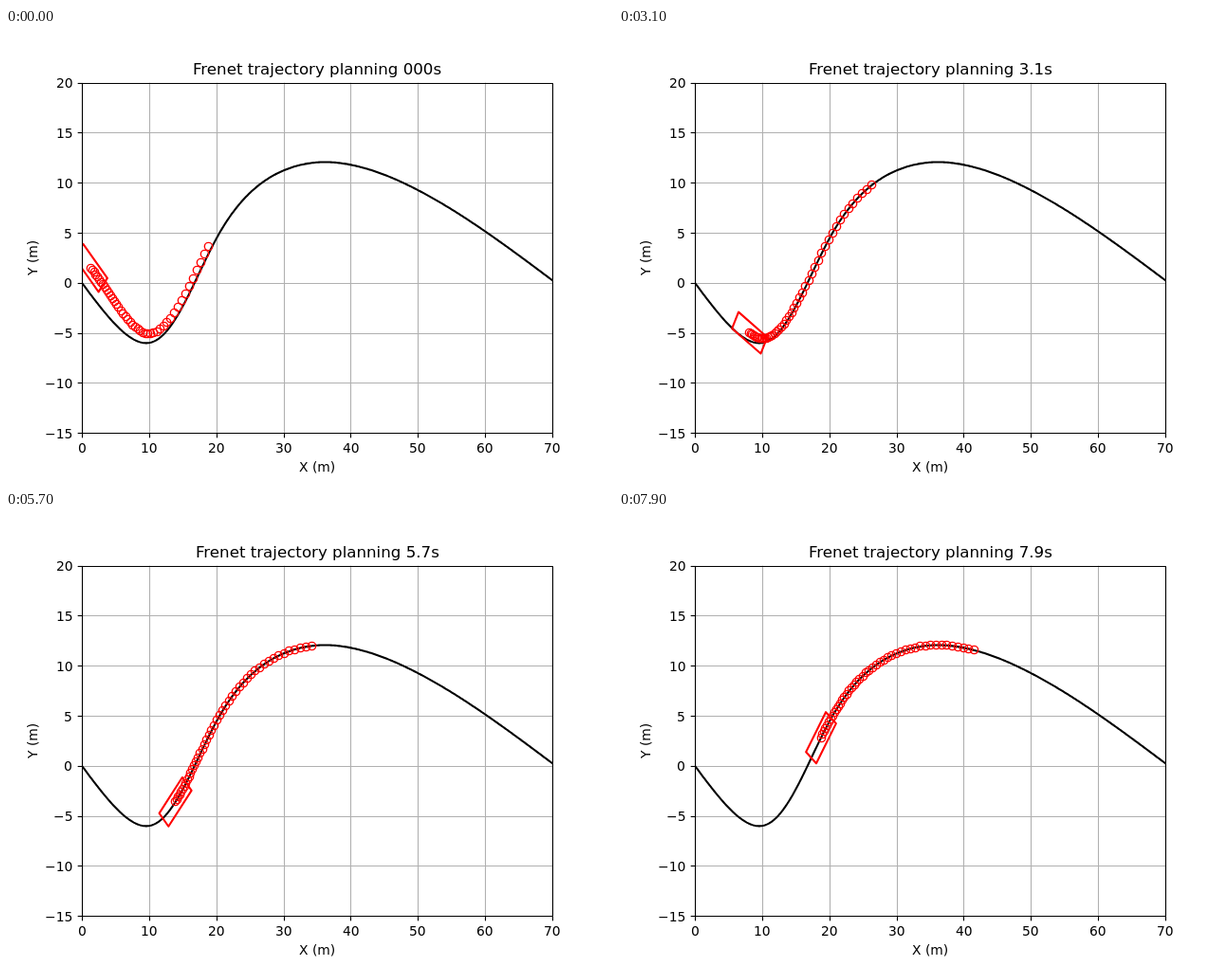
These frames come from a looping animation (640 by 480 pixels, 8 s). An HTML page with a canvas:

```html
<!DOCTYPE html>
<html lang="en">
<head>
<meta charset="utf-8">
<title>Trajectory planning</title>
<style>
  html, body { margin: 0; width: 100%; height: 100%; overflow: hidden; background: #fff; }
  canvas { display: block; width: 640px; height: 480px; }
</style>
</head>
<body>
<canvas id="stage" width="640" height="480"></canvas>
<script>
const ctx = document.getElementById('stage').getContext('2d');
const LOOP = 8000, STEP = 100;
const BOX = { x: 80, y: 57.6, w: 496, h: 369.6 };
const PT = 100 / 72;
const RED = '#ff0000', BLACK = '#000', GRID = '#b0b0b0';

const px = x => BOX.x + x * BOX.w / 70;
const py = y => BOX.y + (20 - y) * BOX.h / 35;
const snap = v => Math.round(v) + 0.5;

// Natural cubic spline through (t[i], v[i])
function spline(t, v) {
  const n = t.length, c = Array(n).fill(0), r = Array(n).fill(0), m = Array(n).fill(0);
  for (let i = 1; i < n - 1; i++) {
    const a = t[i] - t[i - 1], b = t[i + 1] - t[i];
    const den = 2 * (a + b) - a * c[i - 1];
    c[i] = b / den;
    r[i] = (6 * ((v[i + 1] - v[i]) / b - (v[i] - v[i - 1]) / a) - a * r[i - 1]) / den;
  }
  for (let i = n - 2; i > 0; i--) m[i] = r[i] - c[i] * m[i + 1];
  return x => {
    let i = 0;
    while (i < n - 2 && x > t[i + 1]) i++;
    const h = t[i + 1] - t[i], a = (t[i + 1] - x) / h, b = 1 - a;
    return a * v[i] + b * v[i + 1] +
      ((a * a * a - a) * m[i] + (b * b * b - b) * m[i + 1]) * h * h / 6;
  };
}

// Reference road, parametrised by chord length
const wx = [0, 10, 20.5, 28.65, 36, 40, 50, 60, 70.5];
const wy = [0, -6, 5, 10.78, 12.06, 11.79, 9.26, 5.14, 0];
const ws = [0];
for (let i = 1; i < wx.length; i++)
  ws.push(ws[i - 1] + Math.hypot(wx[i] - wx[i - 1], wy[i] - wy[i - 1]));
const roadX = spline(ws, wx), roadY = spline(ws, wy);
const roadEnd = ws[ws.length - 1];

// Point at distance s along the road, d to its left
function place(s, d) {
  const e = 0.01, x = roadX(s), y = roadY(s);
  const dx = roadX(s + e) - x, dy = roadY(s + e) - y, l = Math.hypot(dx, dy);
  return [x - d * dy / l, y + d * dx / l];
}

const lateral = spline([0, 1.8, 3.1, 3.9, 5, 6.2], [2, 1.58, 0.77, 0.445, 0.09, 0]);
const offset = t => t < 6.2 ? Math.max(0, lateral(t)) : 0;
const travel = t => 2.8 * t + 0.0365 * t * t;
const speed = t => 2.8 + 0.073 * t;
const smooth = k => k * k * k * (10 - 15 * k + 6 * k * k);

// Speeds up smoothly over the horizon; the first plan stops short of the centre line
function plan(t) {
  const count = 44, span = 4.4, reach = 25 + 0.065 * t;
  const v0 = speed(t), v1 = 2 * reach / span - v0;
  const fade = Math.max(0, 1 - t / 1.2);
  const pts = [];
  for (let i = 0; i <= count; i++) {
    const k = i / count;
    const s = travel(t) + span * (v0 * k + (v1 - v0) * (k ** 3 - k ** 4 / 2));
    const first = 2 - 1.56 * smooth(k);
    pts.push(place(s, offset(t + k * span) + fade * (first - offset(k * span))));
  }
  return pts;
}

function line(pts, color, width, close) {
  ctx.beginPath();
  for (const [x, y] of pts) ctx.lineTo(x, y);
  if (close) ctx.closePath();
  ctx.strokeStyle = color;
  ctx.lineWidth = width;
  ctx.stroke();
}

// align: 0 left, 0.5 centre, 1 right; glyphs start on whole pixels
function text(str, x, y, size, align) {
  ctx.font = size * PT + 'px "DejaVu Sans", sans-serif';
  ctx.fillStyle = BLACK;
  ctx.fillText(str, Math.round(x - align * ctx.measureText(str).width), Math.round(y));
}

function clipBox() {
  ctx.save();
  ctx.beginPath();
  ctx.rect(BOX.x, BOX.y, BOX.w, BOX.h);
  ctx.clip();
}

function drawGrid() {
  const right = BOX.x + BOX.w, bottom = BOX.y + BOX.h;
  for (let v = 0; v <= 70; v += 10) {
    const x = snap(px(v));
    line([[x, BOX.y], [x, bottom]], GRID, 0.8 * PT);
  }
  for (let v = -15; v <= 20; v += 5) {
    const y = snap(py(v));
    line([[BOX.x, y], [right, y]], GRID, 0.8 * PT);
  }
}

function drawAxes() {
  const l = snap(BOX.x), r = snap(BOX.x + BOX.w);
  const t = snap(BOX.y), b = snap(BOX.y + BOX.h);
  const tick = 3.5 * PT;
  line([[l, t], [r, t], [r, b], [l, b]], BLACK, 0.8 * PT, true);
  for (let v = 0; v <= 70; v += 10) {
    const x = snap(px(v));
    line([[x, b], [x, b + tick]], BLACK, 0.8 * PT);
    text(String(v), px(v), 448, 10, 0.5);
  }
  for (let v = -15; v <= 20; v += 5) {
    const y = snap(py(v));
    line([[l, y], [l - tick, y]], BLACK, 0.8 * PT);
    text(String(v).replace('-', '\u2212'), BOX.x - 2 * tick, py(v) + 5.5, 10, 1);
  }
  text('X (m)', 328, 468, 10, 0.5);
  ctx.save();
  ctx.translate(33, 242);
  ctx.rotate(-Math.PI / 2);
  text('Y (m)', 0, 0, 10, 0.5);
  ctx.restore();
}

function drawRoad() {
  const pts = [];
  for (let s = 0; s <= roadEnd; s += 0.2) pts.push([px(roadX(s)), py(roadY(s))]);
  line(pts, BLACK, 1.5 * PT);
}

function drawPlan(t) {
  ctx.strokeStyle = RED;
  ctx.lineWidth = PT;
  for (const [x, y] of plan(t)) {
    ctx.beginPath();
    ctx.arc(snap(px(x) - 0.5), snap(py(y) - 0.5), 3 * PT, 0, 2 * Math.PI);
    ctx.stroke();
  }
}

function drawCar(t) {
  const [x, y] = place(travel(t), offset(t));
  const [nx, ny] = place(travel(t + 0.05), offset(t + 0.05));
  const a = Math.atan2(ny - y, nx - x), c = Math.cos(a), s = Math.sin(a);
  const corners = [[-1, -1], [-1, 1], [1, 1], [1, -1]].map(([i, j]) => {
    const u = i * 2.48, w = j * 0.95;
    return [px(x + u * c - w * s), py(y + u * s + w * c)];
  });
  line(corners, RED, 1.5 * PT, true);
}

function draw(t) {
  ctx.fillStyle = '#fff';
  ctx.fillRect(0, 0, 640, 480);
  ctx.lineJoin = 'round';
  clipBox();
  drawGrid();
  drawRoad();
  drawPlan(t);
  drawCar(t);
  ctx.restore();
  drawAxes();
  const label = String(t).padStart(3, '0');
  text('Frenet trajectory planning ' + label + 's', 328, 49.3, 12, 0.5);
}

const start = performance.now();
function loop() {
  const ms = (performance.now() - start) % LOOP;
  draw(Math.floor(ms / STEP) / 10);
  requestAnimationFrame(loop);
}
loop();
</script>
</body>
</html>
```
